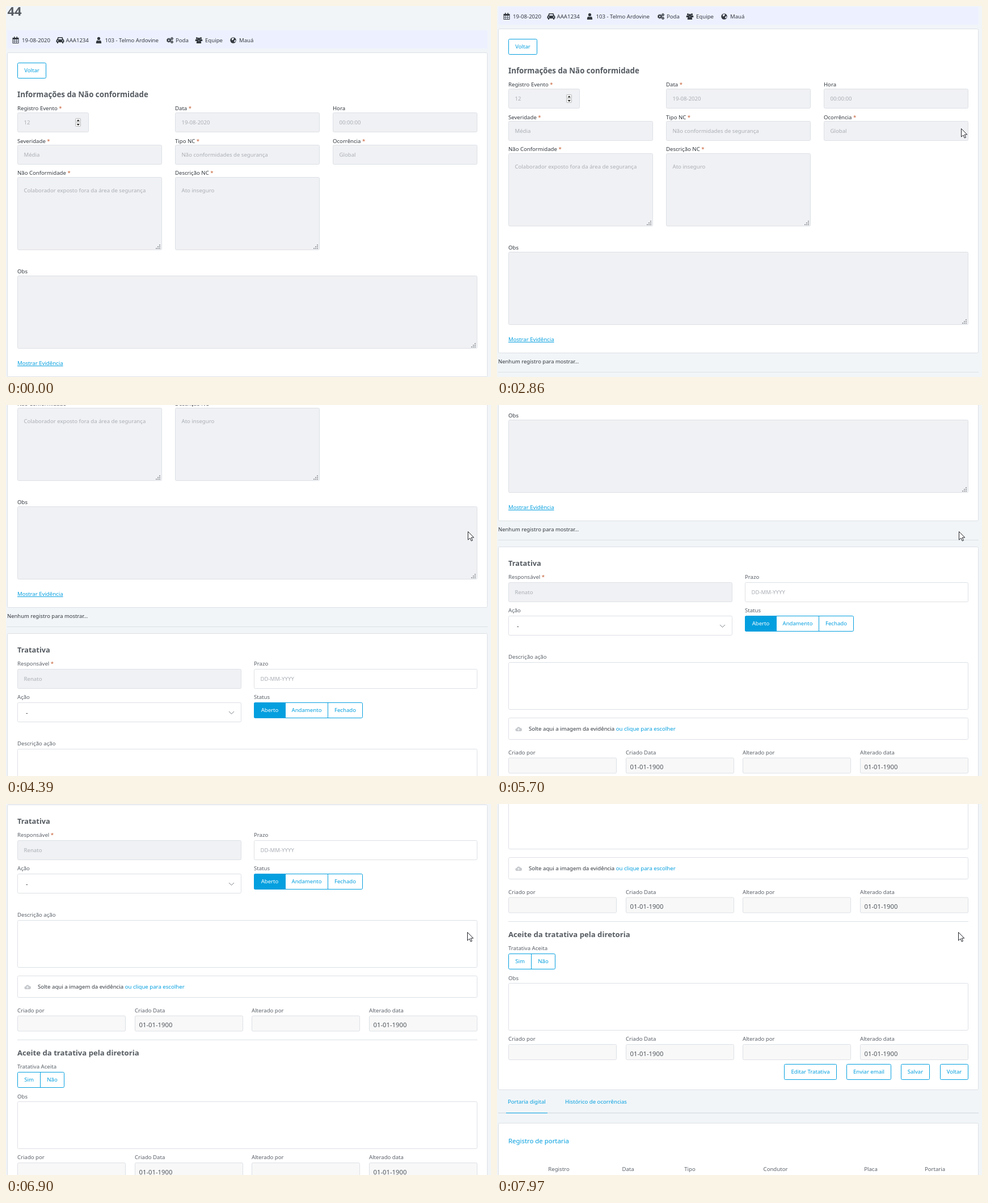
These frames come from a looping animation (855x655 px, 8000 ms). An HTML page:

```html
<!DOCTYPE html>
<html lang="pt">
<head>
<meta charset="utf-8">
<style>
html, body { margin: 0; width: 100%; height: 100%; overflow: hidden; background: #f1f5f8; }
svg { display: block; font-family: "Noto Sans", "Open Sans", sans-serif; }
text { white-space: pre; }
</style>
</head>
<body>
<svg id="stage" width="855" height="655" viewBox="0 0 855 655"></svg>
<script>
const BLUE = '#049fdf', DARK = '#343a40', GREY = '#5a6068', MUTED = '#a9aeb5';
const BORDER = '#dce0e5', OFF = '#f0f1f4', AUDIT = '#f8f8f8', WHITE = '#fff';
const LOOP = 8000;

// y is the middle of the capital letters
function text(x, y, str, fill = GREY, size = 9.6, attrs = '') {
  return `<text x="${x}" y="${Math.round(y + size * .36)}" fill="${fill}" font-size="${size}" ${attrs}>${str}</text>`;
}
const label = (x, y, str, fill = DARK) =>
  text(x, y, str.replace('*', '<tspan fill="#c4562a">*</tspan>'), fill);
const heading = (y, str, size) => text(20, y, str, '#555b61', size, 'font-weight="700"');
const centered = (x, y, str, fill = BLUE) => text(x, y, str, fill, 9.6, 'text-anchor="middle"');
const box = (x, y, w, h, fill = WHITE, stroke = BORDER, r = 2) =>
  `<rect x="${x + .5}" y="${y + .5}" width="${w}" height="${h}" rx="${r}" fill="${fill}" stroke="${stroke}"/>`;
const rule = (x1, x2, y, stroke = '#dbe1e5') => `<path d="M${x1} ${y + .5}H${x2}" stroke="${stroke}"/>`;
const card = (y, h) => box(2, y, 846, h);
const field = (x, y, w, str = '', fill = OFF) => box(x, y, w, 34, fill) + text(x + 11.5, y + 17.5, str, MUTED);
const button = (x, y, w, str) => box(x, y, w, 27, WHITE, BLUE) + centered(x + w / 2 + .5, y + 14, str);

function area(x, y, w, str = '') {
  let dots = '';
  for (let r = 0; r < 3; r++)
    for (let c = 0; c <= r; c++) dots += `M${x + w - 4 - 3 * c} ${y + 119 + 3 * r}h2v2h-2z`;
  return box(x, y, w, 128, OFF) + text(x + 11.5, y + 24, str, MUTED) + `<path d="${dots}" fill="#a0a4a8"/>`;
}

// Joined buttons: edges holds the left, inner and right borders
function group(edges, y, names, active) {
  const last = edges.length - 1;
  let out = box(edges[0], y, edges[last] - edges[0], 27, WHITE, BLUE);
  names.forEach((name, i) => {
    const a = edges[i], b = edges[i + 1];
    if (i === active) out += box(a, y, b - a, 27, BLUE, BLUE);
    if (i) out += `<path d="M${a + .5} ${y + .5}v27" stroke="${BLUE}"/>`;
    out += centered((a + b) / 2 + .5, y + 14, name, i === active ? WHITE : BLUE);
  });
  return out;
}

function audit(y) {
  return [20, 227, 433, 640].map((x, i) =>
    text(x, y, ['Criado por', 'Criado Data', 'Alterado por', 'Alterado data'][i]) +
    box(x, y + 9, 190, 27, AUDIT) +
    (i % 2 ? text(x + 7.5, y + 25.5, '01-01-1900', '#50565c', 11.3) : '')).join('');
}

function gear(x, y, r) {
  return `<circle cx="${x}" cy="${y}" r="${r}" fill="none" stroke="${DARK}" stroke-width="${r * .9}"/>` +
    `<circle cx="${x}" cy="${y}" r="${r * 1.6}" fill="none" stroke="${DARK}" stroke-width="1" stroke-dasharray="${r * .63}"/>`;
}
const person = (x, y, s) =>
  `<path transform="translate(${x} ${y}) scale(${s})" d="M-2.6-3a2.6 2.8 0 1 1 5.2 0a2.6 2.8 0 1 1-5.2 0M-4.6 5.5C-4.8 1-3.5.3-2 .2Q0 1.4 2 .2C3.5.3 4.8 1 4.6 5.5z"/>`;

function infoBar() {
  const items = [[28, '19-08-2020'], [105.5, 'AAA1234'], [174.5, '103 - Telmo Ardovine'],
    [299, 'Poda'], [351, 'Equipe'], [411, 'Mauá']];
  return `<rect x="2" y="43" width="847" height="32" fill="#edf1ff"/>
  <g fill="${DARK}">
    <path fill-rule="evenodd" d="M11.5 56H14v-2h1.5v2h3v-2H20v2h2.500v10h-11zM12.500 59v6h9v-6z"/>
    <path d="M15 59v6M18.500 59v6M12 62h10" stroke="${DARK}" stroke-width=".8"/>
    <path fill-rule="evenodd" d="M91.500 55h8l1.500 4q1.500.5 1.500 2v3H101v2h-2v-2h-7v2h-2v-2h-1.500v-3q0-1.500 1.500-2zM92.700 56.500L92 59h7l-.7-2.500zM90.300 61.500a1 1 0 1 0 2 0a1 1 0 1 0-2 0M98.700 61.500a1 1 0 1 0 2 0a1 1 0 1 0-2 0"/>
    ${person(163.5, 60.5, 1)}${person(336.500, 58.500, .62)}${person(343.500, 58.500, .62)}${person(340, 61, .9)}
    <circle cx="400.500" cy="60.500" r="5.200"/>
    <path d="M398 57l3-1 1 2-2 2-2 .5zM402 61l3-1-.5 2.500-2 1.500z" fill="#edf1ff"/>
  </g>` + gear(287, 60.5, 2.3) + gear(292.5, 57.5, 1.4) + gear(292.5, 63.500, 1.4) +
    items.map(([x, s]) => text(x, 61, s, DARK)).join('');
}

function spinner() {
  return box(122, 198, 9, 7, '#f4f4f4', '#b9bbbd', 1) + box(122, 205, 9, 7, '#f4f4f4', '#b9bbbd', 1) +
    '<path d="M124.500 203.500l2.700-3 2.700 3zM124.500 208l2.700 3 2.700-3z" fill="#222"/>';
}

const cols = [20, 298, 576];
const page = [
  text(2.5, 9, '44', '#555b61', 22, 'font-weight="700"'),
  infoBar(),

  card(82, 572),
  button(20, 100, 50, 'Voltar'),
  heading(156, 'Informações da Não conformidade', 13.3),
  ['Registro Evento *', 'Data *', 'Hora'].map((s, i) => label(cols[i], 181, s)),
  field(20, 188, 125, '12'), spinner(),
  field(298, 188, 254, '19-08-2020'),
  field(576, 188, 254, '00:00:00'),
  ['Severidade *', 'Tipo NC *', 'Ocorrência *'].map((s, i) => label(cols[i], 238.5, s)),
  ['Média', 'Não conformidades de segurança', 'Global'].map((s, i) => field(cols[i], 245, 254, s)),
  label(20, 295, 'Não Conformidade *'), label(298, 295, 'Descrição NC *'),
  area(20, 302, 254, 'Colaborador exposto fora da área de segurança'),
  area(298, 302, 254, 'Ato inseguro'),
  label(20, 469, 'Obs'), area(20, 476, 810),
  text(20, 630.5, 'Mostrar Evidência', BLUE, 9.6, 'text-decoration="underline"'),

  text(2, 670, 'Nenhum registro para mostrar...', DARK, 9.45),
  rule(2, 849, 688),

  card(700, 712),
  heading(729.5, 'Tratativa', 12.8),
  label(20, 754, 'Responsável *', GREY), label(437, 754, 'Prazo', GREY),
  field(20, 763, 394, 'Renato'), field(437, 763, 393, 'DD-MM-YYYY', WHITE),
  label(20, 813, 'Ação', GREY), label(437, 813, 'Status', GREY),
  box(20, 822, 394, 34), text(35, 840.5, '-', DARK, 11),
  '<path d="M393 838l4.500 4.500 4.500-4.500" fill="none" stroke="#7d8388"/>',
  group([437, 492, 567, 628], 822, ['Aberto', 'Andamento', 'Fechado'], 0),
  label(20, 895, 'Descrição ação', GREY), box(20, 904, 810, 83),
  box(20, 1002, 810, 38),
  '<path d="M35 1026a2.500 2.500 0 0 1-.3-5a3.300 3.300 0 0 1 6.200-.8a2.900 2.900 0 0 1 .4 5.800z" fill="#c6c9cd"/>',
  '<path d="M38 1025v-3.500M36.300 1023l1.700-1.800 1.700 1.800" fill="none" stroke="#fff"/>',
  text(56, 1022, `Solte aqui a imagem da evidência <tspan fill="${BLUE}">ou clique para escolher</tspan>`, DARK, 9.65),
  audit(1063.5),
  rule(20, 831, 1115),
  heading(1138, 'Aceite da tratativa pela diretoria', 13.15),
  label(20, 1162.5, 'Tratativa Aceita', GREY),
  group([20, 60, 102], 1172, ['Sim', 'Não']),
  label(20, 1215.5, 'Obs', GREY), box(20, 1224, 810, 83),
  audit(1323),
  button(506, 1367, 92, 'Editar Tratativa'), button(616, 1367, 78, 'Enviar email'),
  button(712, 1367, 50, 'Salvar'), button(781, 1367, 49, 'Voltar'),

  text(19, 1434, 'Portaria digital', BLUE), text(120, 1434, 'Histórico de ocorrências', BLUE),
  rule(2, 849, 1453, '#cfd8de'), rule(16, 89, 1453, BLUE),
  card(1471, 300),
  text(20, 1502.5, 'Registro de portaria', BLUE, 11.4),
  [[109, 'Registro'], [231, 'Data'], [340, 'Tipo'], [491, 'Condutor'], [659, 'Placa'], [772, 'Portaria']]
    .map(([x, s]) => centered(x, 1552.5, s, GREY))
].flat().join('');

const stage = document.getElementById('stage');
stage.innerHTML = `<g id="page">${page}</g>
  <path id="cursor" d="M.5.5V15L4 11.900L6.300 17L8.500 16L6.200 11H10.800z" fill="#fff" stroke="#23252b"/>`;
const pageEl = document.getElementById('page'), cursorEl = document.getElementById('cursor');

// Scrolling advances in steps: first time, last time, number of steps
const bursts = [[2710, 3400, 10], [3860, 4390, 8], [4780, 5320, 8], [5700, 6490, 11],
  [6490, 6580, 2], [6810, 7580, 11], [7580, 7730, 3], [7880, 7970, 2]];
const scrollPath = [[0, 0], [2700, 0], [2710, 5], [2863, 42], [3323, 143], [3400, 148],
  [3850, 148], [3860, 153], [4314, 293], [4390, 297], [4770, 297], [4780, 302], [5243, 441], [5320, 445],
  [5690, 445], [5700, 450], [6490, 690], [6580, 693], [6800, 693], [6810, 695], [6887, 699],
  [7580, 886], [7655, 888], [7730, 891], [7870, 891], [7880, 895], [7960, 895], [7970, 908], [LOOP, 908]];
const cursorStops = [[1060, 842, 184], [1140, 834, 193], [1220, 826, 202], [1290, 821, 208], [1370, 818, 212],
  [1770, 818, 213], [2390, 818, 215], [2540, 818, 216], [3100, 814, 222], [3550, 814, 223], [6580, 813, 226]];

function snap(t) {
  const burst = bursts.find(([a, b]) => t >= a && t <= b);
  if (!burst) return t;
  const [a, b, n] = burst, gap = (b - a) / (n - 1);
  return a + Math.floor((t - a + 8) / gap) * gap;
}

function scrollAt(t) {
  const i = Math.max(1, scrollPath.findIndex(p => p[0] >= t));
  const [t0, y0] = scrollPath[i - 1], [t1, y1] = scrollPath[i];
  return Math.round(y0 + (y1 - y0) * (t - t0) / (t1 - t0));
}

function draw(t) {
  pageEl.setAttribute('transform', `translate(0 ${-scrollAt(snap(t))})`);
  const stop = cursorStops.filter(s => s[0] <= t).pop();
  cursorEl.style.display = stop ? '' : 'none';
  if (stop) cursorEl.setAttribute('transform', `translate(${stop[1]} ${stop[2]})`);
}

const start = performance.now();
function tick() {
  draw((performance.now() - start) % LOOP);
  requestAnimationFrame(tick);
}
tick();
</script>
</body>
</html>
```
